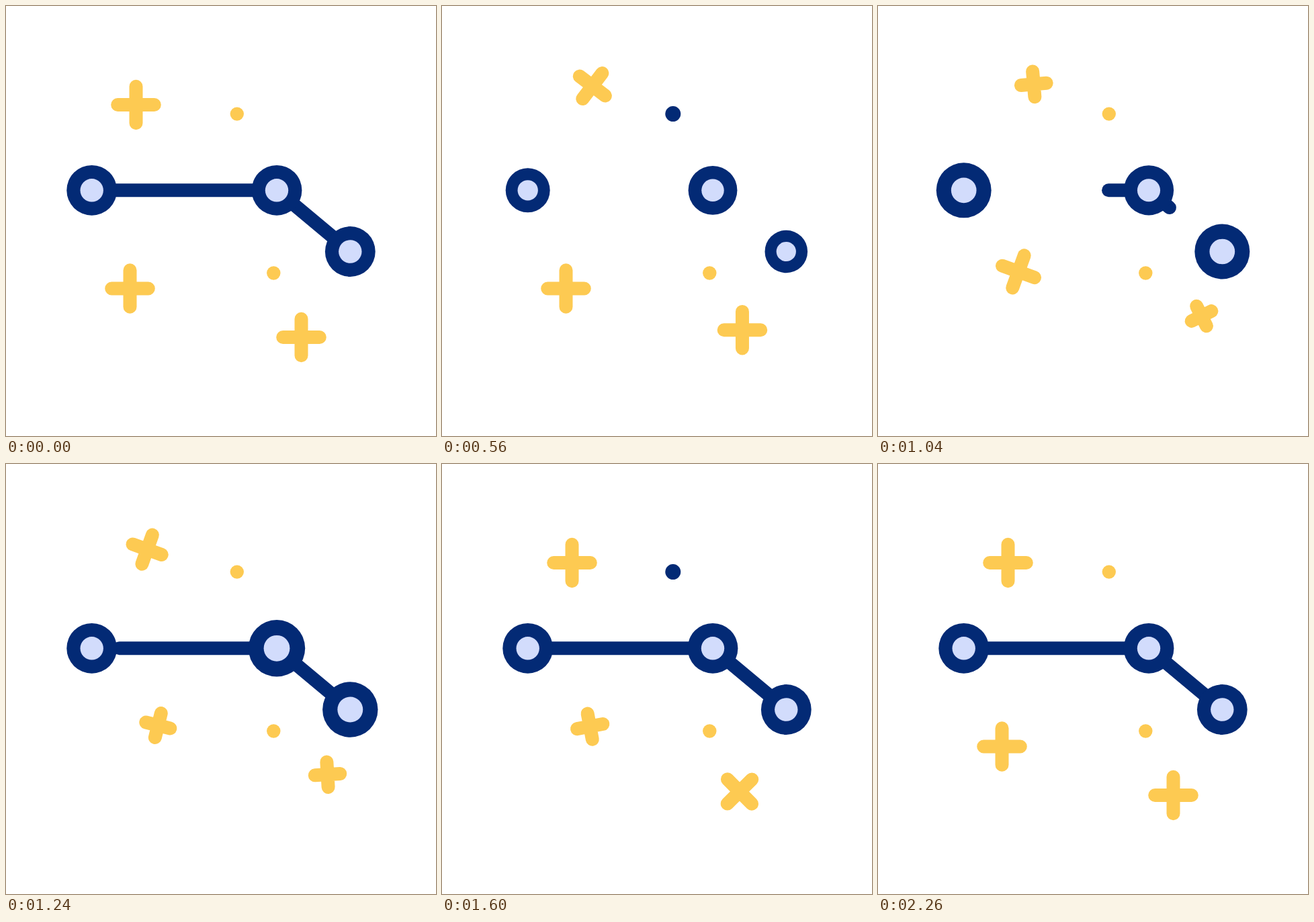
Write an HTML page that moves like this. It is 640 px wide and 640 px high and loops after 2.4 s.

```html
<!DOCTYPE html>
<html lang="en">
<head>
<meta charset="utf-8">
<title>Constellation</title>
<style>
  html, body { margin: 0; width: 100%; height: 100%; overflow: hidden; background: #fff; }
  svg { display: block; width: 100%; height: 100%; }
</style>
</head>
<body>
<svg id="sky" viewBox="0 0 640 640" fill="none" stroke-width="20" stroke-linecap="round"></svg>
<script>
const LOOP = 2400, STEP = 20;
const NAVY = '#032a75', GOLD = '#fdca52', PALE = '#d2dcfc';
const ARM = 27.3;      // half length of a star's bar, also where lines meet a node
const BLINK = 240, BLINK_GAP = 1040;

const stars = [
  { x: 193.5, y: 147, delay: 0 },
  { x: 439.5, y: 493, delay: 210 },
  { x: 184.5, y: 420.5, delay: 530 }
];
const nodes = [
  { x: 127.7, y: 274.3, delay: 0 },
  { x: 403, y: 274.3, delay: 340 },
  { x: 512.3, y: 365.5, delay: 210 }
];
const dots = [
  { x: 343.8, y: 160.6, start: 460 },
  { x: 398.3, y: 397.5, start: 760 }
];
const [left, hub, right] = nodes;
const lines = [link(hub, left), link(hub, right)];

// 0 before start, 1 after end, smooth between
function ease(t, start, end) {
  const p = Math.min(1, Math.max(0, (t - start) / (end - start)));
  return p * p * (3 - 2 * p);
}

function outAndBack(t, outStart, outEnd, backStart, backEnd) {
  return ease(t, outStart, outEnd) - ease(t, backStart, backEnd);
}

// A line between two nodes that stops short of both centres
function link(a, b) {
  const dx = b.x - a.x, dy = b.y - a.y, length = Math.hypot(dx, dy);
  const at = dist => [a.x + dx * dist / length, a.y + dy * dist / length];
  return { from: at(ARM), to: at(length - ARM) };
}

// Quadratic curve from 0 through the pull of one handle
const bend = (p, handle, end) => 2 * p * (1 - p) * handle + p * p * end;

function starPose(t) {
  const move = outAndBack(t, 180, 730, 950, 1505);
  return {
    dx: bend(move, 15, 42),
    dy: bend(move, -26, -31.5),
    turn: 180 * outAndBack(t, 390, 970, 980, 1590),
    arm: ARM - 10.8 * outAndBack(t, 400, 830, 800, 1580)
  };
}

// Shrink, swell past full size, settle
function nodeScale(t) {
  return 1 - .15 * ease(t, 180, 330) + .284 * ease(t, 460, 940) - .134 * ease(t, 940, 1220);
}

const sky = document.getElementById('sky');
function set(el, attrs) {
  for (const name in attrs) el.setAttribute(name, attrs[name]);
}
function add(tag, attrs) {
  const el = document.createElementNS('http://www.w3.org/2000/svg', tag);
  set(el, attrs);
  return sky.appendChild(el);
}

for (const s of stars) s.el = add('path', { stroke: GOLD });
for (const d of dots) d.el = add('circle', { cx: d.x, cy: d.y });
for (const l of lines) l.el = add('path', { stroke: NAVY });
for (const n of nodes) {
  n.rim = add('circle', { cx: n.x, cy: n.y, fill: NAVY });
  n.core = add('circle', { cx: n.x, cy: n.y, fill: PALE });
}

function draw(t) {
  for (const s of stars) {
    const { dx, dy, turn, arm } = starPose(t - s.delay);
    set(s.el, {
      d: `M${-arm} 0H${arm}M0 ${-arm}V${arm}`,
      transform: `translate(${s.x + dx} ${s.y + dy}) rotate(${turn})`
    });
  }
  for (const d of dots) {
    const lit = t >= d.start && (t - d.start) % BLINK_GAP < BLINK;
    set(d.el, { fill: lit ? NAVY : GOLD, r: lit ? 11.5 : 10.2 });
  }
  const reach = 1 - outAndBack(t, 185, 505, 960, 1290);
  for (const { from, to, el } of lines) {
    const tip = from.map((v, i) => v + (to[i] - v) * reach);
    set(el, { d: reach > .001 ? `M${from}L${tip}` : '' });
  }
  for (const n of nodes) {
    const scale = nodeScale(t - n.delay);
    set(n.rim, { r: 37.4 * scale });
    set(n.core, { r: 17.2 * scale });
  }
}

const begin = performance.now();
function tick() {
  const t = (performance.now() - begin) % LOOP;
  draw(Math.floor(t / STEP) * STEP);
  requestAnimationFrame(tick);
}
tick();
</script>
</body>
</html>
```
